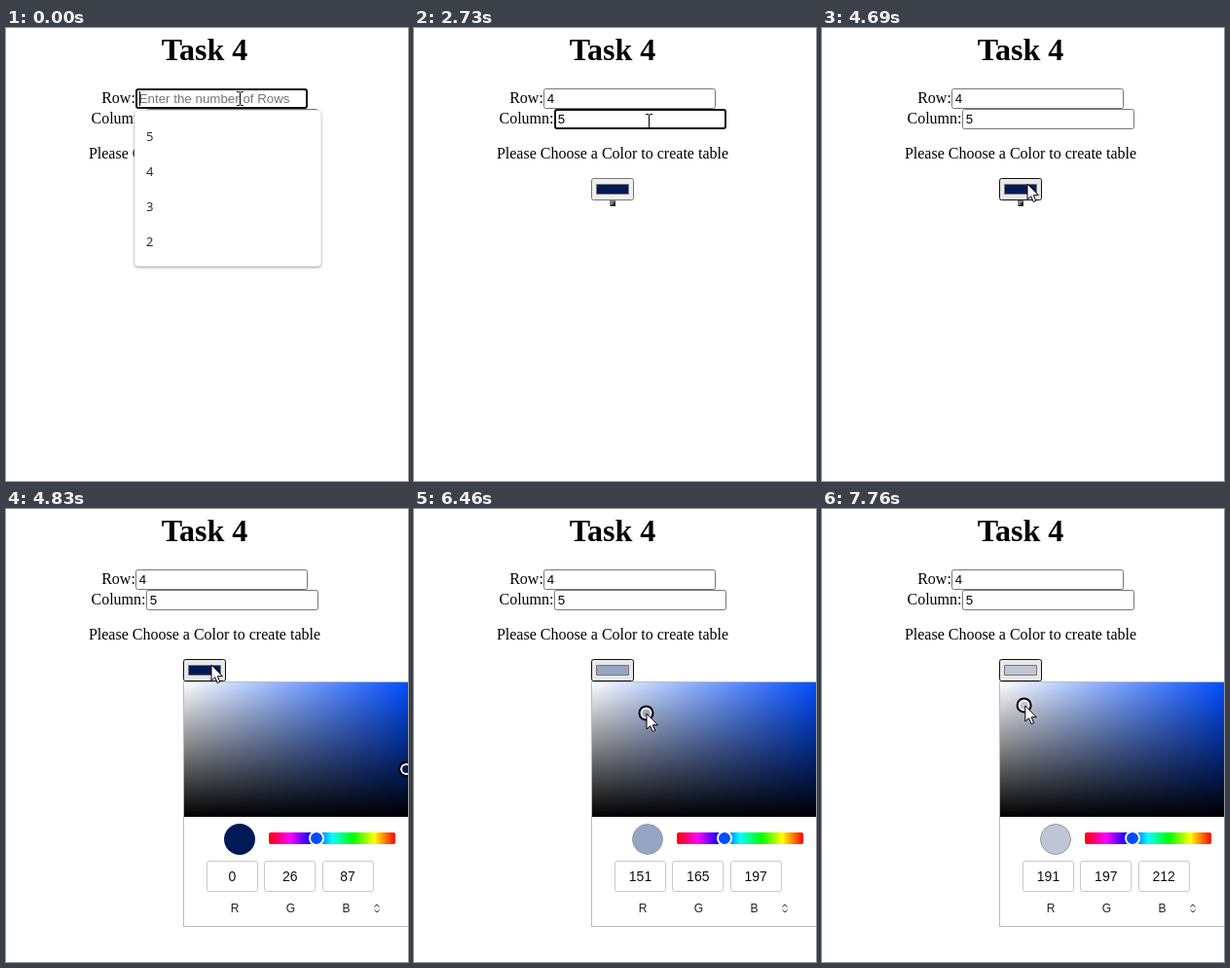
An HTML page with a canvas for the animation above (8 s loop, 413 by 465 pixels).

```html
<!DOCTYPE html>
<html lang="en">
<head>
<meta charset="utf-8">
<title>Task 4</title>
<style>
  html, body { margin: 0; width: 100%; height: 100%; overflow: hidden; background: #fff; }
  canvas { display: block; width: 413px; height: 465px; }
</style>
</head>
<body>
<canvas id="stage"></canvas>
<script>
const W = 413, H = 465, LOOP = 8000;
const SERIF = '"Liberation Serif", "Times New Roman", serif';
const SANS = '"Liberation Sans", Arial, sans-serif';
const MENU = '"Open Sans", "Noto Sans", sans-serif';
const HUE = 222, NAVY = [0, 26, 87];

const canvas = document.getElementById('stage');
const ctx = canvas.getContext('2d');
const dpr = window.devicePixelRatio || 1;
canvas.width = W * dpr;
canvas.height = H * dpr;
ctx.scale(dpr, dpr);

// Each step: start time and the properties that change there.
const steps = [
  [0, { focus: 'row', row: '', col: '', caret: true, menu: true, open: false, lit: false,
        mouse: 'beam', x: 240, y: 72, pick: null }],
  [150, { row: '4', menu: false }],
  [620, { caret: false, y: 77 }],
  [770, { x: 241, y: 86 }],
  [920, { y: 95 }],
  [1080, { focus: 'col', caret: true }],
  [1610, { caret: false }],
  [2140, { col: '5', caret: true }],
  [2730, { caret: false }],
  [3100, { col: '', caret: true }],
  [3410, { col: '5' }],
  [3810, { caret: false }],
  [4250, { caret: true, mouse: 'arrow', x: 226, y: 128 }],
  [4410, { x: 211, y: 160 }],
  [4690, { focus: '', caret: false, lit: true }],
  [4830, { open: true }],
  [5390, { x: 214, y: 166 }],
  [5540, { x: 228, y: 184 }],
  [5690, { x: 245, y: 203 }],
  [5920, { x: 257, y: 212 }],
  [6150, { x: 263, y: 216 }],
  [6300, { x: 261, y: 216, pick: [260.5, 215.5] }],
  [6460, { x: 239, y: 210, pick: [238.5, 209.5] }],
  [6610, { x: 219, y: 204, pick: [218.5, 203.5] }],
  [6760, { x: 208, y: 202, pick: [207, 201.5] }],
  [7040, { x: 205, y: 201.5, pick: [204, 201] }],
  [7200, { x: 205.6, pick: [204.6, 201] }],
  [7350, { x: 206.5, pick: [205.5, 201.1] }],
  [7500, { x: 207.5, pick: [206.3, 201.2] }],
  [7630, { x: 208.2, pick: [207, 201.3] }],
  [7760, { x: 208.8, y: 202, pick: [207.6, 201.4] }]
];

function stateAt(t) {
  const s = {};
  for (const [start, change] of steps) if (start <= t) Object.assign(s, change);
  return s;
}

function text(str, x, y, font, color = '#000', align = 'left') {
  ctx.font = font;
  ctx.fillStyle = color;
  ctx.textAlign = align;
  ctx.fillText(str, x, y);
}

function box(x, y, w, h, r, fill, stroke, line = 1) {
  ctx.beginPath();
  ctx.roundRect(x, y, w, h, r);
  if (fill) { ctx.fillStyle = fill; ctx.fill(); }
  if (stroke) { ctx.strokeStyle = stroke; ctx.lineWidth = line; ctx.stroke(); }
}

function circle(x, y, r, fill, stroke, line = 1) {
  ctx.beginPath();
  ctx.arc(x, y, r, 0, Math.PI * 2);
  if (fill) { ctx.fillStyle = fill; ctx.fill(); }
  if (stroke) { ctx.strokeStyle = stroke; ctx.lineWidth = line; ctx.stroke(); }
}

function path(points, fill, stroke, close = true) {
  ctx.beginPath();
  for (const [x, y] of points) ctx.lineTo(x, y);
  if (close) ctx.closePath();
  if (fill) { ctx.fillStyle = fill; ctx.fill(); }
  if (stroke) { ctx.strokeStyle = stroke; ctx.lineWidth = 1; ctx.stroke(); }
}

function rect(x, y, w, h, fill) {
  ctx.fillStyle = fill;
  ctx.fillRect(x, y, w, h);
}

const rgb = c => `rgb(${c.join(',')})`;

function pickedColor(pick) {
  if (!pick) return NAVY;
  const sat = (pick[0] - 184.6) / 229;
  const max = Math.round(255 * (1 - (pick[1] - 178) / 138));
  const min = max * (1 - sat);
  return [min, min + (max - min) * (240 - HUE) / 60, max].map(Math.round);
}

function field(x, y, value, hint, focused, caret) {
  if (focused) box(x + 1, y + 1, 175, 19, 2, '#fff', '#101010', 2);
  else box(x + 0.5, y + 0.5, 176, 20, 2, '#fff', '#767676');
  ctx.save();
  ctx.beginPath();
  ctx.rect(x + 3, y + 2, 170, 17);
  ctx.clip();
  text(value || hint, x + 3.7, y + 15, '13.333px ' + SANS, value ? '#000' : '#757575');
  ctx.restore();
  if (focused && caret) rect(x + (value ? 11 : 4), y + 3, 1, 15, '#000');
}

function drawForm(s, color) {
  text('Task 4', 204, 33, 'bold 32px ' + SERIF, '#000', 'center');
  text('Row:', 98.2, 77, '16px ' + SERIF);
  text('Column:', 87.5, 98, '16px ' + SERIF);
  text('Please Choose a Color to create table', 84.9, 134, '16px ' + SERIF);
  field(133, 62, s.row, 'Enter the number of Rows', s.focus === 'row', s.caret);
  field(144, 83, s.col, 'Enter the number of Columns', s.focus === 'col', s.caret);

  box(182.5, 154.5, 43, 22, 2, s.lit ? '#e8e8e8' : '#efefef', s.lit ? '#101010' : '#767676');
  box(187.5, 160.5, 33, 10, 0, rgb(color), '#777');
  // empty table: a bevelled square
  path([[201, 183], [201, 177], [207, 177]], '#808080');
  path([[207, 177], [207, 183], [201, 183]], '#2c2c2c');
}

function drawMenu() {
  ctx.save();
  ctx.shadowColor = 'rgba(0,0,0,0.35)';
  ctx.shadowBlur = 3 * dpr;
  ctx.shadowOffsetY = 1.5 * dpr;
  box(132, 84.5, 192, 160, 4, '#fff');
  ctx.restore();
  box(132, 84.5, 192, 160, 4, '#fff', '#d8d8d8', 0.7);
  ['5', '4', '3', '2'].forEach((n, i) => text(n, 144, 116 + 36 * i, '13px ' + MENU, '#222'));
}

function gradient(x0, y0, x1, y1, colors) {
  const g = ctx.createLinearGradient(x0, y0, x1, y1);
  colors.forEach((c, i) => g.addColorStop(i / (colors.length - 1), c));
  return g;
}

function drawPicker(s, color) {
  const pure = `hsl(${HUE},100%,50%)`;
  rect(182, 177, 240, 252, '#bbb');
  rect(183, 178, 240, 250, '#fff');

  rect(183, 178, 232, 138, gradient(183, 0, 415, 0, ['#fff', pure]));
  rect(183, 178, 232, 138, gradient(0, 178, 0, 316, ['rgba(0,0,0,0)', '#000']));
  const [hx, hy] = s.pick || [411, 267];
  circle(hx, hy, 5, null, '#fff', 2);
  circle(hx, hy, 7, null, '#000', 2);

  if (s.pick) circle(240, 339, 15.5, rgb(color), '#9a9ca6');
  else circle(240, 339, 16, rgb(color));

  const rainbow = ['#f00', '#f0f', '#00f', '#0ff', '#0f0', '#ff0', '#f00'];
  box(270, 332, 130, 12, 2, gradient(270, 0, 400, 0, rainbow));
  circle(319, 338, 7, pure, '#fff', 2);

  color.forEach((n, i) => {
    const x = 206.5 + 59.3 * i;
    box(Math.floor(x) + 0.5, 361.5, 52, 31, 2, '#fff', '#c8c8c8');
    text(n, x + 26, 382, '14px ' + SANS, '#111', 'center');
    text('RGB'[i], 235 + 57.3 * i, 414, '12px ' + SANS, '#222', 'center');
  });
  path([[378.5, 408.5], [381, 406], [383.5, 408.5]], null, '#333', false);
  path([[378.5, 411.5], [381, 414], [383.5, 411.5]], null, '#333', false);
}

function drawMouse(s) {
  ctx.save();
  ctx.translate(s.x, s.y);
  if (s.mouse === 'beam') {
    rect(0, -6, 1, 13, '#000');
    for (const y of [-7, 7]) {
      rect(-3, y, 3, 1, '#000');
      rect(1, y, 3, 1, '#000');
    }
  } else {
    path([[0, 0], [0, 16], [3.7, 12.7], [6.2, 18.5], [8.8, 17.4], [6.3, 11.7], [11.4, 11.7]],
      '#fff', '#000');
  }
  ctx.restore();
}

function draw(t) {
  const s = stateAt(t), color = pickedColor(s.pick);
  rect(0, 0, W, H, '#fff');
  drawForm(s, color);
  if (s.menu) drawMenu();
  if (s.open) drawPicker(s, color);
  drawMouse(s);
}

const begin = performance.now();
function tick() {
  draw((performance.now() - begin) % LOOP);
  requestAnimationFrame(tick);
}
tick();
</script>
</body>
</html>
```
